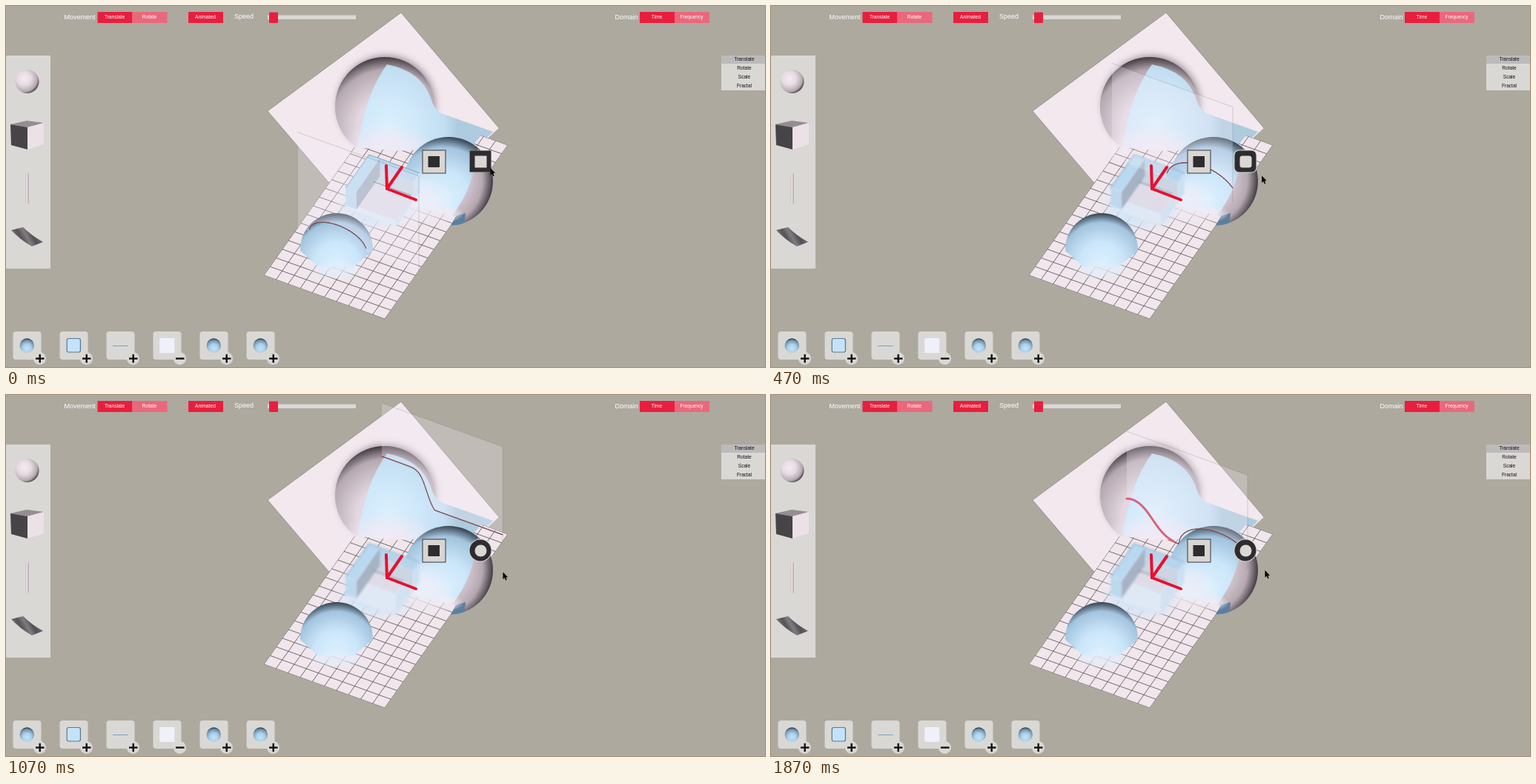
An HTML page with a canvas that plays this animation: 1024 px wide and 488 px high, repeating every 2060 ms.

```html
<!DOCTYPE html>
<html lang="en">
<head>
<meta charset="utf-8">
<title>Surface editor</title>
<style>
html, body { margin: 0; width: 100%; height: 100%; overflow: hidden; background: #ada99f; }
canvas { display: block; }
</style>
</head>
<body>
<canvas id="stage" width="1024" height="488"></canvas>
<script>
const ctx = document.getElementById('stage').getContext('2d');
const LOOP = 2060;
const PANEL = '#d9d8d5', RED = '#e91e3e', DARK = '#2f2c2f', RIM = 'rgba(80,70,74,.45)';
const BLUE = ['#dcf0fd', '#cbe6fa', '#a3c4de', '#33414f'];
const PINK = ['#f0e5ee', '#e2d6df', '#b5a8b1', '#423a40'];

// Slice position on the floor: time, depth
const SLICE = [[0, .723], [270, .428], [670, .223], [1070, .042], [1270, 0], [1600, .06], [1870, .205]];
// Sofa parts on the floor: u0, u1, s0, s1, height
const BACK = [.224, .64, .365, .414, 27];
const SEAT = [.224, .64, .414, .555, 7];
const ARM = [.224, .313, .365, .555, 27];

const lerp = (a, b, k) => a + (b - a) * k;
const clamp = v => Math.min(1, Math.max(0, v));
const smooth = v => v * v * (3 - 2 * v);
const hold = t => t - t % 200 + (t % 200 < 70 ? 0 : 70);

function depthAt(t) {
  const next = SLICE.findIndex(([time]) => time > t);
  if (next < 0) return SLICE.at(-1)[1];
  const [[t0, s0], [t1, s1]] = SLICE.slice(next - 1, next + 1);
  return lerp(s0, s1, (t - t0) / (t1 - t0));
}

// Tilted view of the floor: u across, s towards the viewer, h upwards
const project = (u, s, h = 0) => [514 + 163 * u - 166 * s, 129 + 59 * u + 235 * s - h];

function paint(gradient, colors, at = i => i / (colors.length - 1)) {
  colors.forEach((color, i) => gradient.addColorStop(at(i), color));
  return gradient;
}
function trace(points, close = true) {
  ctx.beginPath();
  points.forEach(([x, y]) => ctx.lineTo(x, y));
  if (close) ctx.closePath();
}
function poly(points, fill) {
  trace(points);
  ctx.fillStyle = fill;
  ctx.fill();
}
function line(points, color, width) {
  trace(points, false);
  ctx.strokeStyle = color;
  ctx.lineWidth = width;
  ctx.stroke();
}
function path(data, fill) {
  ctx.fillStyle = fill;
  ctx.fill(new Path2D(data));
}
function box(x, y, w, h, fill, r = 0) {
  ctx.beginPath();
  ctx.roundRect(x, y, w, h, r);
  ctx.fillStyle = fill;
  ctx.fill();
}
function disc(x, y, r, fill) {
  ctx.beginPath();
  ctx.arc(x, y, r, 0, 7);
  ctx.fillStyle = fill;
  ctx.fill();
}
function clipped(points, drawInside) {
  ctx.save();
  trace(points);
  ctx.clip();
  drawInside();
  ctx.restore();
}
function glow(x, y, rx, ry, rgb, strength = 1) {
  ctx.save();
  ctx.translate(x, y);
  ctx.scale(rx, ry);
  disc(0, 0, 1, paint(ctx.createRadialGradient(0, 0, 0, 0, 0, 1),
    [1, .75, 0].map(a => `rgba(${rgb},${a * strength})`), i => i / 2));
  ctx.restore();
}
// Sphere shading lit from the side (dx, dy), darkest on the far rim
function shade(x, y, r, colors, dx = 0, dy = .4) {
  const lx = x + dx * r, ly = y + dy * r;
  return paint(ctx.createRadialGradient(lx, ly, 0, lx, ly, r * (1 + Math.hypot(dx, dy))),
    colors, i => Math.sqrt(i / 3) * (i === 1 ? .75 : 1));
}
const ball = (x, y, r, ...rest) => disc(x, y, r, shade(x, y, r, ...rest));

function text(str, x, y, size, color, align = 'center') {
  ctx.font = `${size}px "Liberation Sans", Arial, sans-serif`;
  ctx.textAlign = align;
  ctx.textBaseline = 'middle';
  ctx.fillStyle = color;
  ctx.fillText(str, x, y);
}
function button(label, x, active = true) {
  box(x, 8, 47, 15, active ? RED : '#ea687b');
  text(label, x + 23, 15.5, 6.6, '#fff');
}

const bulge = (u, s, cu, cs, ru, rs) => ((u - cu) / ru) ** 2 + ((s - cs) / rs) ** 2;
const cap = (d, h) => h * Math.sqrt(Math.max(0, 1 - d));
const block = (u, s, [u0, u1, s0, s1, h]) => u > u0 && u < u1 && s > s0 && s < s1 ? h : 0;

function height(u, s) {
  return Math.max(
    56 / (1 + bulge(u, s, .05, .06, .33, .157) ** 5),
    s < .1 && u > .38 ? 9 : 0,
    cap(bulge(u, s, .75, .25, .33, .18), 37),
    cap(bulge(u, s, .33, .78, .27, .12), 25),
    ...[SEAT, ARM, BACK].map(part => block(u, s, part)));
}

function sheet() {
  const [left, top, right] = [[353, 142], [533, 9], [665, 165]];
  poly([left, top, right, [610, 215], [435, 238]], '#f2e8ee');
  line([[435, 238], left, top, right], RIM, .8);

  ctx.save();
  ctx.filter = 'blur(5px)';
  disc(513, 133, 66, 'rgba(95,84,92,.6)');
  ctx.restore();
  ball(511, 136, 67, PINK, .05, .42);
  path('M514 79Q485 118 474 192L560 195L636 190L657 170L590 146Q578 142 573 124Q560 88 514 79Z',
    shade(512, 136, 67, ['#dcf0fd', '#cfe8fa', '#c3def2', '#aecbdf'], .05));
  glow(513, 198, 70, 40, '241,234,245');
}

function grid() {
  const visible = [project(0, 1), project(1, 1), project(1, 0), [641, 175], [628, 190], [530, 196], [470, 191]];
  clipped(visible, () => {
    poly(visible, '#f0e6eb');
    for (let i = 0; i <= 20; i++) {
      const k = i / 20;
      if (i % 2 === 0) line([project(k, 0), project(k, 1)], '#5b555b', .85);
      line([project(0, k), project(1, k)], '#5b555b', .85);
    }
    glow(505, 262, 66, 48, '230,234,247');
    glow(573, 262, 52, 40, '240,234,244');
    glow(447, 330, 56, 34, '240,234,244', .8);
  });
}

function rightBall() {
  const [x, y, r] = [597, 237, 60];
  const aboveFloor = [[530, 170], [670, 170], [670, 300], [598, 300], [607, 284], [555, 272], [530, 232]];
  clipped(aboveFloor, () => {
    ball(x, y, r, BLUE, -.12, .38);
    ctx.beginPath();
    ctx.arc(x, y, r, 0, 7);
    ctx.clip();
    path('M637 182Q634 245 600 285L612 300H670V170Z', shade(x, y, r, PINK, -.3, -.05));
    path('M598 299L607 284L620 280L618 299Z', '#5c7f9d');
    glow(552, 268, 52, 46, '238,239,249');
    glow(590, 281, 28, 12, '240,236,245');
  });
}

// Extruded floor rectangle; the inset bevels its two visible sides
function prism([u0, u1, s0, s1, h], [top, front, side], inset = 0, base = 0) {
  const u = u1 - inset, s = s1 - inset;
  poly([project(u0, s, h), project(u, s, h), project(u1, s1, base), project(u0, s1, base)], front);
  poly([project(u, s0, h), project(u, s, h), project(u1, s1, base), project(u1, s0, base)], side);
  poly([project(u0, s0, h), project(u, s0, h), project(u, s, h), project(u0, s, h)], top);
}

function sofa(k) {
  ctx.save();
  ctx.filter = `blur(${.5 + k}px)`;
  glow(498, 276, 54, 28, '205,228,246', .9);
  prism(BACK, ['#b5d5ed', '#ccd5e3', '#c9e1f3']);
  prism(SEAT, ['#dfdce8', '#dfe9f6', '#d3e2f1'], k * .075);
  prism(ARM, ['#b9d9f0', '#bdd9ee', '#a6b3c4'], 0, 3);
  line([project(.313, .414, 7), project(.62 - k * .07, .414, 7)], 'rgba(100,106,122,.7)', 1.2);
  line([project(.224, .555, 27), project(.224, .365, 27), project(.64, .365, 27)], '#8fafc8', 1.2);
  ctx.restore();
}

function frontDome() {
  clipped([[390, 275], [502, 275], [496, 330], [468, 353], [422, 353], [396, 330]],
    () => ball(446, 329, 49, BLUE));
  glow(446, 357, 40, 13, '226,238,250', .8);
}

function glass(s) {
  const curve = Array.from({ length: 161 }, (_, i) => {
    const h = height(i / 160, s);
    return [...project(i / 160, s, h), h];
  });
  const edge = [project(0, s, 128), project(1, s, 128), project(1, s)];
  poly([edge[0], edge[1], ...curve.toReversed()], 'rgba(242,236,246,.27)');
  line(edge, 'rgba(125,115,118,.35)', .8);

  const split = curve.findIndex(p => p[2] < 2);
  const thick = s > .17 && s < .3;
  line(curve.slice(0, Math.max(0, split)), thick ? '#d7647a' : '#805258', thick ? 3 : 1.2);
  let last = null;
  curve.slice(Math.max(0, split)).forEach(p => {
    if (last && last[2] > 1 && p[2] > 1) line([last, p], '#805258', 1.2);
    last = p;
  });
}

function axes() {
  for (const end of [[513, 216], [534, 218], [553, 262]]) line([[514, 247], end], '#e90f2f', 4);
}

function cornerIcons(k) {
  box(561.5, 194.5, 32, 32, '#3a3739');
  box(562.5, 195.5, 30, 30, '#d8d6d2');
  box(569.5, 203, 15.5, 15, DARK);
  const rim = clamp(k * 3);
  box(625.5 - rim, 195.5 - rim, 29 + 2 * rim, 29 + 2 * rim, PANEL, k * 16);
  box(625.5, 195.5, 29, 29, DARK, k * 14.5);
  box(632.5, 202.5, 16, 16, PANEL, k * 8);
}

function cursor(t, k) {
  const back = clamp((t - 1600) / 270) * 4;
  const move = smooth(clamp(k * 1.15));
  ctx.save();
  ctx.translate(lerp(653.5, 670.5, move) - back, lerp(219, 239.5, move) - back * .6);
  ctx.strokeStyle = '#ddd';
  path('M0 0V9.5L2.1 7.6L3.7 11L5.2 10.3L3.7 7.1L6.5 6.8Z', '#000');
  ctx.restore();
}

function leftPanel() {
  box(0, 67, 60, 288, PANEL);
  ball(28.5, 102, 16, ['#f5ebf1', '#e6dbe2', '#b3a9af', '#3f393d'], -.25, -.25);
  path('M6 160L28 155L51 158L29 164Z', '#958d92');
  path('M6 160L29 164V194L7 188Z', '#474447');
  path('M29 164L51 158V187L29 194Z', '#ebe1e7');
  box(26.5, 225.5, 4, 42.5, paint(ctx.createLinearGradient(26, 0, 30.5, 0), ['#b8afb4', '#f2e8ee', '#a0979c']), 2);
  path('M7 303L23 299Q34 310 50 319L35 325Q19 316 7 303Z',
    paint(ctx.createLinearGradient(15, 318, 40, 304), ['#777276', '#575256', '#817c80', '#555055', '#69646a']));
}

function rightPanel() {
  box(965, 67, 59, 47, PANEL);
  box(965, 67, 59, 11, '#bdbabb');
  ['Translate', 'Rotate', 'Scale', 'Fractal'].forEach((label, i) => text(label, 996, 72.5 + i * 11.8, 6.6, '#111'));
}

const ICONS = {
  ball: x => ball(x, 459, 9.7, ['#c4e3f9', '#abd0ea', '#6d8ca5', '#1f2c38']),
  cube(x) {
    box(x - 9.7, 449, 19.5, 19.5, '#587a94', 3);
    box(x - 8.5, 450, 17, 17.5, '#c5e3f8', 2);
  },
  line: x => line([[x - 10, 459.5], [x + 10, 459.5]], '#7d9fc0', 1),
  plane: x => box(x - 10, 449, 20, 20, '#f0f0fa')
};

function bottomTiles() {
  ['ball', 'cube', 'line', 'plane', 'ball', 'ball'].forEach((kind, i) => {
    const x = 9.5 + 63 * i;
    box(x, 440, 38, 38, PANEL, 4);
    ICONS[kind](x + 18.8);
    disc(x + 36, 476.5, 8.5, PANEL);
    box(x + 30.5, 475.4, 11.5, 2.4, '#111');
    if (kind !== 'plane') box(x + 35, 470.8, 2.4, 11.5, '#111');
  });
}

function topBar() {
  text('Movement', 78.5, 16, 9, '#fff', 'left');
  button('Translate', 123.5);
  button('Rotate', 170.5, false);
  button('Animated', 246);
  text('Speed', 308, 14.5, 9, '#fff', 'left');
  box(353, 12.5, 119, 5.5, PANEL);
  box(355, 8.5, 12, 14.5, RED, 1);
  text('Domain', 821.5, 16, 9, '#fff', 'left');
  button('Time', 855);
  button('Frequency', 902, false);
}

function draw(time) {
  const t = hold(time), s = depthAt(t), roundness = clamp(t / 1070);
  const sliceBehind = s < .12;
  ctx.lineCap = ctx.lineJoin = 'round';
  box(0, 0, 1024, 488, '#ada99f');
  sheet();
  grid();
  if (sliceBehind) glass(s);
  rightBall();
  sofa(roundness);
  frontDome();
  if (!sliceBehind) glass(s);
  axes();
  cornerIcons(roundness);
  leftPanel();
  rightPanel();
  bottomTiles();
  topBar();
  cursor(t, roundness);
}

function tick() {
  draw(performance.now() % LOOP);
  requestAnimationFrame(tick);
}
tick();
</script>
</body>
</html>
```
